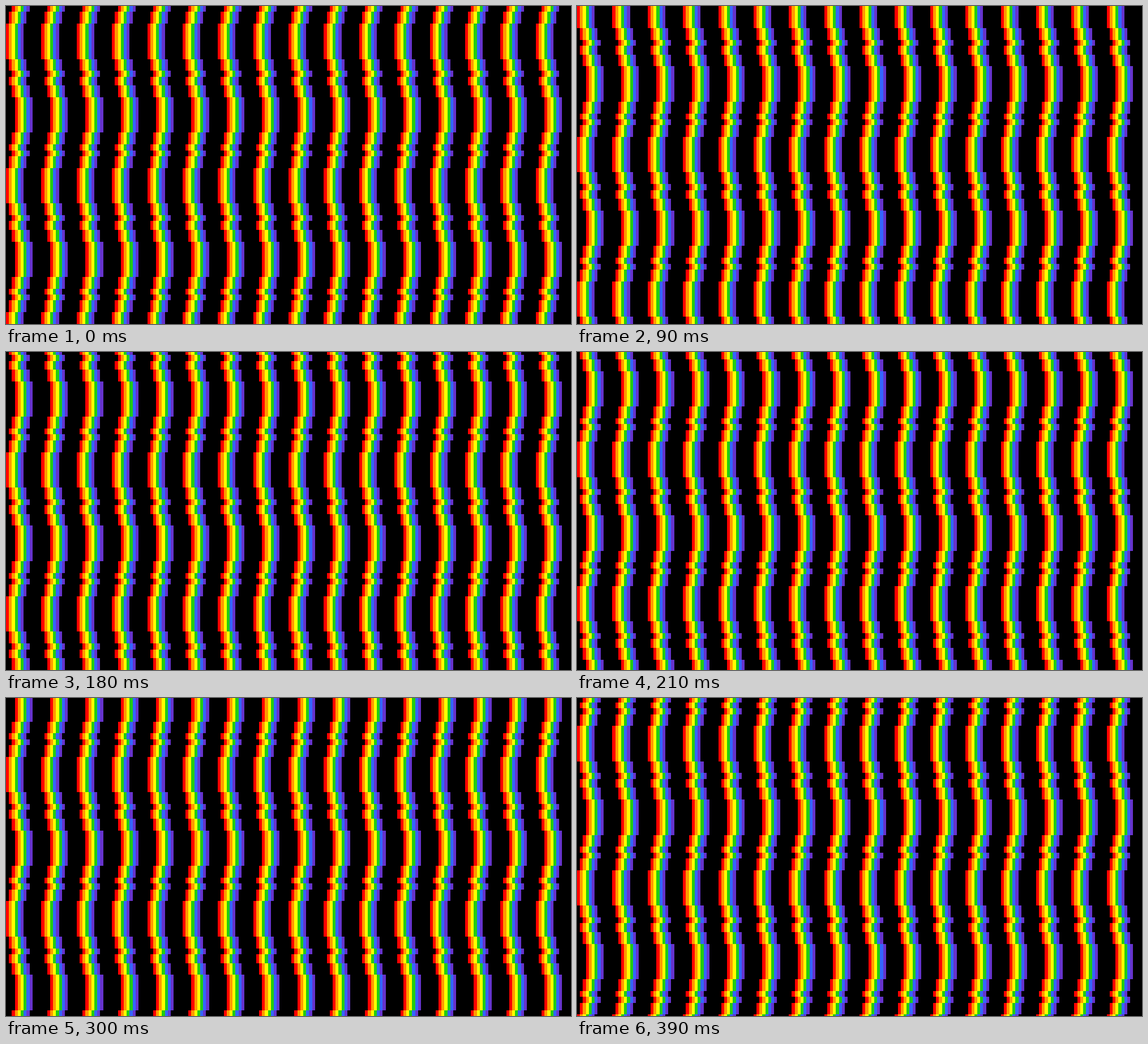
Recreate the animation shown at these times as an HTML page with a canvas. Size 998 by 561 pixels, loop 0.42 s.

```html
<!DOCTYPE html>
<html>
<head>
<meta charset="utf-8">
<title>Rainbow waves</title>
<style>
  html, body { margin: 0; width: 100%; height: 100%; overflow: hidden; background: #000; }
  canvas { display: block; }
</style>
</head>
<body>
<canvas id="stage" width="998" height="561"></canvas>
<script>
const ctx = document.getElementById('stage').getContext('2d');
const COLS = 384, ROWS = 216, CELL = 2;
const COLORS = ['#ff0000', '#ff9900', '#ffff00', '#22cc11', '#3366ff', '#6633cc'];
const STRIPES = 16, SPACING = 24;
const STEP_MS = 30, STEPS = 14, RISE = 7, PERIOD = 98, FIRST_ROW = 12;

// One wave from top to bottom: [height in rows, shift in cells]
const WAVE = [[24, 0], [8, 1], [4, 2], [6, 1], [8, 2], [24, 3], [8, 2], [4, 1], [4, 2], [8, 1]];

const px = col => Math.round(col * 998 / COLS);
const py = row => Math.round(row * 561 / ROWS);

function fillCells(col, row, width, height) {
  const x = px(col), y = py(row);
  ctx.fillRect(x, y, px(col + width) - x, py(row + height) - y);
}

function drawBand(row, height, shift) {
  COLORS.forEach((color, i) => {
    ctx.fillStyle = color;
    for (let s = 0; s < STRIPES; s++) {
      fillCells(s * SPACING + (shift + i) * CELL, row, CELL, height);
    }
  });
}

function draw(time) {
  const step = Math.floor(time / STEP_MS) % STEPS;
  ctx.fillStyle = '#000';
  ctx.fillRect(0, 0, 998, 561);
  let row = FIRST_ROW - PERIOD - step * RISE;
  while (row < ROWS) {
    for (const [height, shift] of WAVE) {
      if (row + height > 0 && row < ROWS) drawBand(row, height, shift);
      row += height;
    }
  }
}

const start = performance.now();
function tick() {
  draw(performance.now() - start);
  requestAnimationFrame(tick);
}
tick();
</script>
</body>
</html>
```
